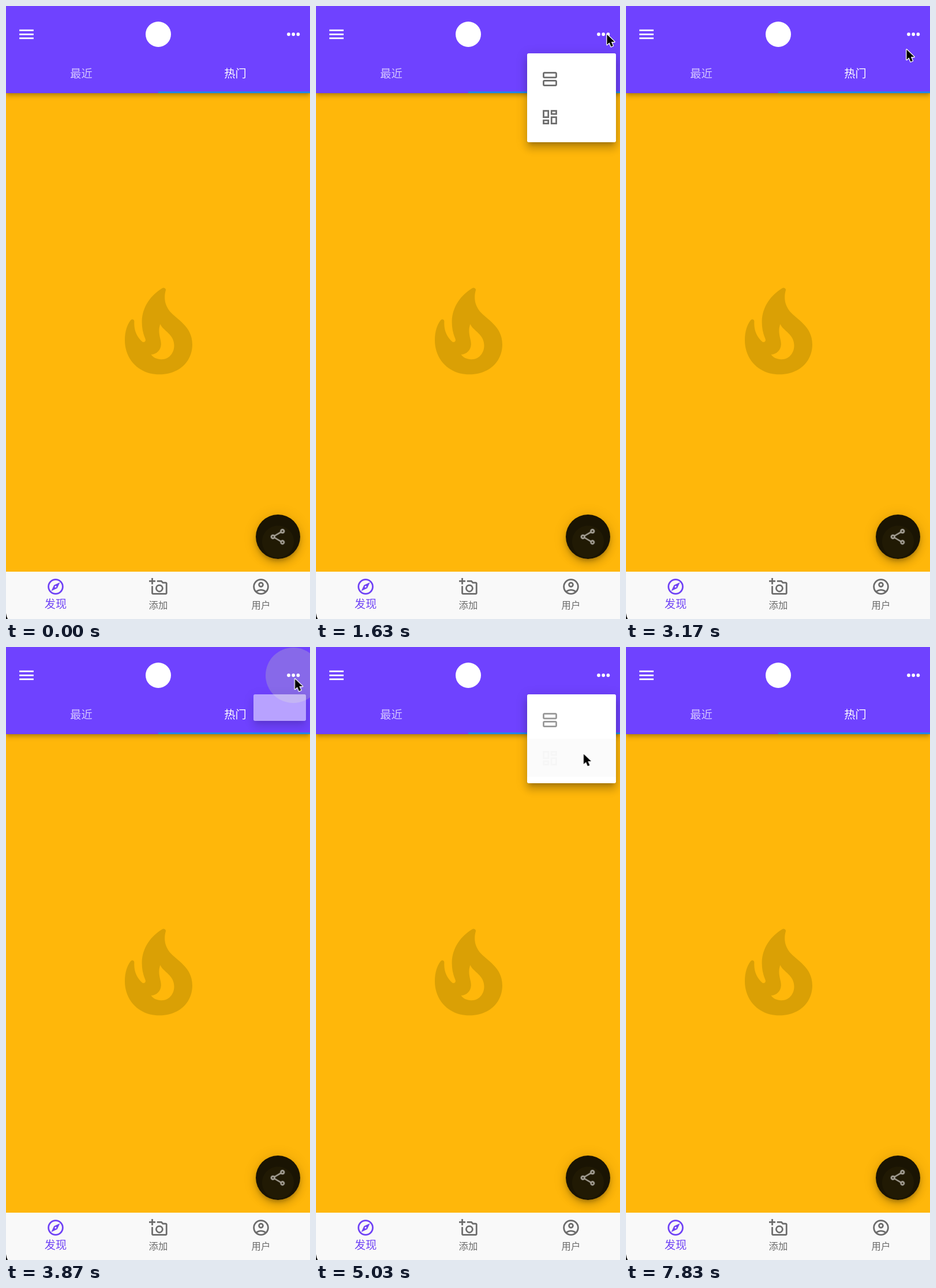
Animation, 527 px wide and 1062 px high, one loop 7.96 s. Source, as an HTML page:

```html
<!DOCTYPE html>
<html lang="zh-CN">
<head>
<meta charset="utf-8">
<title>发现</title>
<style>
@property --v { syntax: "<number>"; inherits: true; initial-value: 0; }
:root { --loop: 7960ms; --purple: #6f42ff; --grey: #6b6b6b; }
html, body { margin: 0; width: 100%; height: 100%; overflow: hidden; }
body { position: relative; background: #ffb70a; }
body > * { position: absolute; }
.scene { left: 0; top: 0; width: 527px; height: 1062px; }
text { font-family: "Noto Sans CJK SC", "Noto Sans CJK", "Noto Sans SC", sans-serif; text-anchor: middle; }

.bar {
  left: 0; top: 0; width: 527px; height: 151px; background: var(--purple);
  box-shadow: 0 2.7px 5.5px -1.4px #0003, 0 5.5px 6.9px #00000024, 0 1.4px 13.7px #0000001f;
}
.tab { left: 264px; top: 148px; width: 263px; height: 3px; background: #2186eb; }
.nav { left: 0; top: 979.5px; width: 527px; height: 82.5px; background: #f9f9f9; }
.fab {
  left: 432.5px; top: 881px; width: 77px; height: 77px; border-radius: 50%;
  background: radial-gradient(circle 28px at 38.5px 47px, #211a04 27px, #1a1403 28px);
  box-shadow: 0 4.1px 6.9px -1.4px #0003, 0 8.2px 13.7px #00000024, 0 1.4px 24px #0000001f;
}

.ripple {
  fill: #bcbcbc; opacity: 0; transform-origin: 498px 49px;
  animation: ripple var(--loop) linear infinite;
}
@keyframes ripple {
  0%, 13.191% { opacity: 0; transform: scale(.2); }
  13.945% { opacity: .32; }
  14.824% { transform: scale(1); }
  14.95% { opacity: .32; }
  17.211% { opacity: 0; transform: scale(1); }
  17.22%, 46.859% { opacity: 0; transform: scale(.2); }
  47.613% { opacity: .32; }
  48.492% { transform: scale(1); }
  48.618% { opacity: .32; }
  50.879%, 100% { opacity: 0; transform: scale(1); }
}

/* --v runs 0 to 1; width, height and items each follow a part of it */
.menu {
  right: calc(100% - 520px); top: 82px; overflow: hidden; border-radius: 2.7px; background: #fff;
  width: calc(153.6px * min(1, var(--v) * 3.5));
  height: calc(153.6px * min(1, var(--v) * 1.75));
  opacity: min(1, calc(var(--v) * 3));
  box-shadow: 0 6.9px 6.9px -4.1px #0003, 0 11px 13.7px 1.4px #00000024, 0 4.1px 19.2px 2.7px #0000001f;
  animation: menu var(--loop) linear infinite;
}
@keyframes menu {
  0%, 14.322% { --v: 0; }
  18.09%, 32.412% { --v: 1; }
  34.925%, 47.99% { --v: 0; }
  51.759%, 62.161% { --v: 1; }
  64.673%, 100% { --v: 0; }
}
.row { position: absolute; right: 0; width: 153.6px; height: 66px; }
.row::before {
  content: ""; position: absolute; inset: 0; background: #bcbcbc; opacity: 0;
  animation: press1 var(--loop) linear infinite;
}
.row + .row::before { animation-name: press2; }
.row svg {
  position: absolute; left: 22.1px; top: 16.5px; width: 33px; height: 33px; fill: var(--grey);
  opacity: clamp(0, calc((var(--v) - var(--from)) / .4286), 1);
}
@keyframes press1 {
  0%, 29.899% { opacity: 0; }
  31.156% { opacity: .4; }
  33.857%, 100% { opacity: 0; }
}
@keyframes press2 {
  0%, 59.548% { opacity: 0; }
  60.905% { opacity: .4; }
  63.606%, 100% { opacity: 0; }
}

.cursor {
  left: 0; top: 0; width: 20px; height: 28px; overflow: visible;
  animation: cursor var(--loop) ease infinite;
}
@keyframes cursor {
  0%, 3.141% { transform: translate(530px, 200px); }
  10.05%, 20.603% { transform: translate(503px, 47px); }
  28.266%, 35.804% { transform: translate(443px, 131px); }
  44.849%, 52.136% { transform: translate(499.5px, 53px); }
  56.156%, 64.698% { transform: translate(462.5px, 183px); }
  69.975%, 71.985% { transform: translate(465px, 257px); }
  73.17% { transform: translate(487px, 257px); opacity: 1; }
  73.18%, 99.9% { transform: translate(530px, 200px); opacity: 0; }
  100% { transform: translate(530px, 200px); opacity: 1; }
}
</style>
</head>
<body>
<div class="bar"></div>
<div class="tab"></div>
<div class="nav"></div>
<div class="fab"></div>

<svg class="scene" viewBox="0 0 527 1062">
  <circle class="ripple" cx="498" cy="49" r="48"/>
  <circle cx="264" cy="49" r="22" fill="#fff"/>

  <g fill="#fff">
    <path transform="translate(19 32.5) scale(1.375)" d="M3 18h18v-2H3zm0-5h18v-2H3zm0-7v2h18V6z"/>
    <circle cx="490" cy="49" r="2.9"/>
    <circle cx="498.2" cy="49" r="2.9"/>
    <circle cx="506.4" cy="49" r="2.9"/>
    <g font-size="19.2" font-weight="500">
      <text x="130.5" y="124.2" opacity=".7">最近</text>
      <text x="397.5" y="124.2">热门</text>
    </g>
  </g>

  <path fill="#daa005" fill-rule="evenodd" d="M270 489.4Q273 487.4 275.5 489Q277.6 490.4 276.8 493
    C273.5 505 275 518 284 529C296 543 323 555 323 586C323 617 299 638.3 266 638.3
    C230 638.3 206 612 206 579C206 564 210 552 216 544.5Q218 542 220.6 543.2Q222.6 544.2 222.4 547
    C221.5 562 227 573 236 581.4Q238.3 583.2 240.6 581.4Q242.6 579.6 241.6 577
    C237 566 235.3 556 235.6 545C236.5 521 251 501 270 489.4Z
    M267.5 551C272 563 291.5 568 291.5 588C291.5 602 282 612.2 269.5 612.2
    C261.5 612.2 255 609 251.5 603.8C261 603.6 268.6 596 268.8 586C269 576 262 566 267.5 551Z"/>

  <path fill="#aaa59b" fill-rule="evenodd" transform="translate(454.5 903) scale(1.375)" d="M18 16.08c-.76 0-1.44.3-1.96.77L8.91 12.7c.05-.23.09-.46.09-.7s-.04-.47-.09-.7l7.05-4.11c.54.5 1.25.81 2.04.81 1.66 0 3-1.34 3-3s-1.34-3-3-3-3 1.34-3 3c0 .24.04.47.09.7L8.04 9.81C7.5 9.31 6.79 9 6 9c-1.66 0-3 1.34-3 3s1.34 3 3 3c.79 0 1.5-.31 2.04-.81l7.12 4.16c-.05.21-.08.43-.08.65 0 1.61 1.31 2.92 2.92 2.92s2.92-1.31 2.92-2.92-1.31-2.92-2.92-2.92zM18 4a1 1 0 1 1 0 2 1 1 0 0 1 0-2zM6 13a1 1 0 1 1 0-2 1 1 0 0 1 0 2zm12 7a1 1 0 1 1 0-2 1 1 0 0 1 0 2z"/>

  <g fill="#6f42f5">
    <path fill-rule="evenodd" transform="translate(69.5 989.5) scale(1.375)" d="M12 2a10 10 0 1 0 0 20 10 10 0 0 0 0-20zm0 18a8 8 0 1 1 0-16 8 8 0 0 1 0 16zm-5.5-2.5l7.51-3.49L17.5 6.5 9.99 9.99zm5.5-6.6a1.1 1.1 0 1 1 0 2.2 1.1 1.1 0 0 1 0-2.2z"/>
    <text x="86" y="1043.3" font-size="19.2">发现</text>
  </g>

  <g fill="#6b6b6b" font-size="16.4">
    <path fill-rule="evenodd" transform="translate(248 989.5) scale(1.375)" d="M21 6h-3.17L16 4h-6v2h5.12l1.83 2H21v12H5v-9H3v9c0 1.1.9 2 2 2h16c1.1 0 2-.9 2-2V8c0-1.1-.9-2-2-2zM8 14a5 5 0 0 0 10 0 5 5 0 0 0-10 0zm5-3a3 3 0 1 1 0 6 3 3 0 0 1 0-6zM5 6h3V4H5V1H3v3H0v2h3v3h2z"/>
    <text x="264" y="1044.2">添加</text>
    <path fill-rule="evenodd" transform="translate(425.5 989.5) scale(1.375)" d="M12 2a10 10 0 1 0 0 20 10 10 0 0 0 0-20zM7.35 18.5C8.66 17.56 10.26 17 12 17s3.34.56 4.65 1.5c-1.31.94-2.91 1.5-4.65 1.5s-3.34-.56-4.65-1.5zm10.79-1.38C16.45 15.8 14.32 15 12 15s-4.45.8-6.14 2.12A8 8 0 0 1 4 12a8 8 0 0 1 16 0c0 1.95-.7 3.73-1.86 5.12zM12 6a3.5 3.5 0 1 0 0 7 3.5 3.5 0 0 0 0-7zm0 5a1.5 1.5 0 1 1 0-3 1.5 1.5 0 0 1 0 3z"/>
    <text x="442" y="1044.2">用户</text>
  </g>

  <path d="M0 1052Q.8 1058 3 1062H0Z"/>
</svg>

<div class="menu">
  <div class="row" style="top: 11px; --from: .2857">
    <svg viewBox="0 0 24 24"><path fill-rule="evenodd" d="M19 13H5c-1.1 0-2 .9-2 2v4c0 1.1.9 2 2 2h14c1.1 0 2-.9 2-2v-4c0-1.1-.9-2-2-2zm0 6H5v-4h14zM19 3H5c-1.1 0-2 .9-2 2v4c0 1.1.9 2 2 2h14c1.1 0 2-.9 2-2V5c0-1.1-.9-2-2-2zm0 6H5V5h14z"/></svg>
  </div>
  <div class="row" style="top: 77px; --from: .5714">
    <svg viewBox="0 0 24 24"><path fill-rule="evenodd" d="M19 5v2h-4V5zM9 5v6H5V5zm10 8v6h-4v-6zM9 17v2H5v-2zM21 3h-8v6h8zM11 3H3v10h8zm10 8h-8v10h8zm-10 4H3v6h8z"/></svg>
  </div>
</div>

<svg class="cursor" viewBox="0 0 20 28">
  <path d="M1.5 2.5V20l4-3.7 3 7 3.4-1.4-3-6.8h5.6z" stroke="#fff" stroke-width="2.6" paint-order="stroke" stroke-linejoin="round"/>
</svg>
</body>
</html>
```
